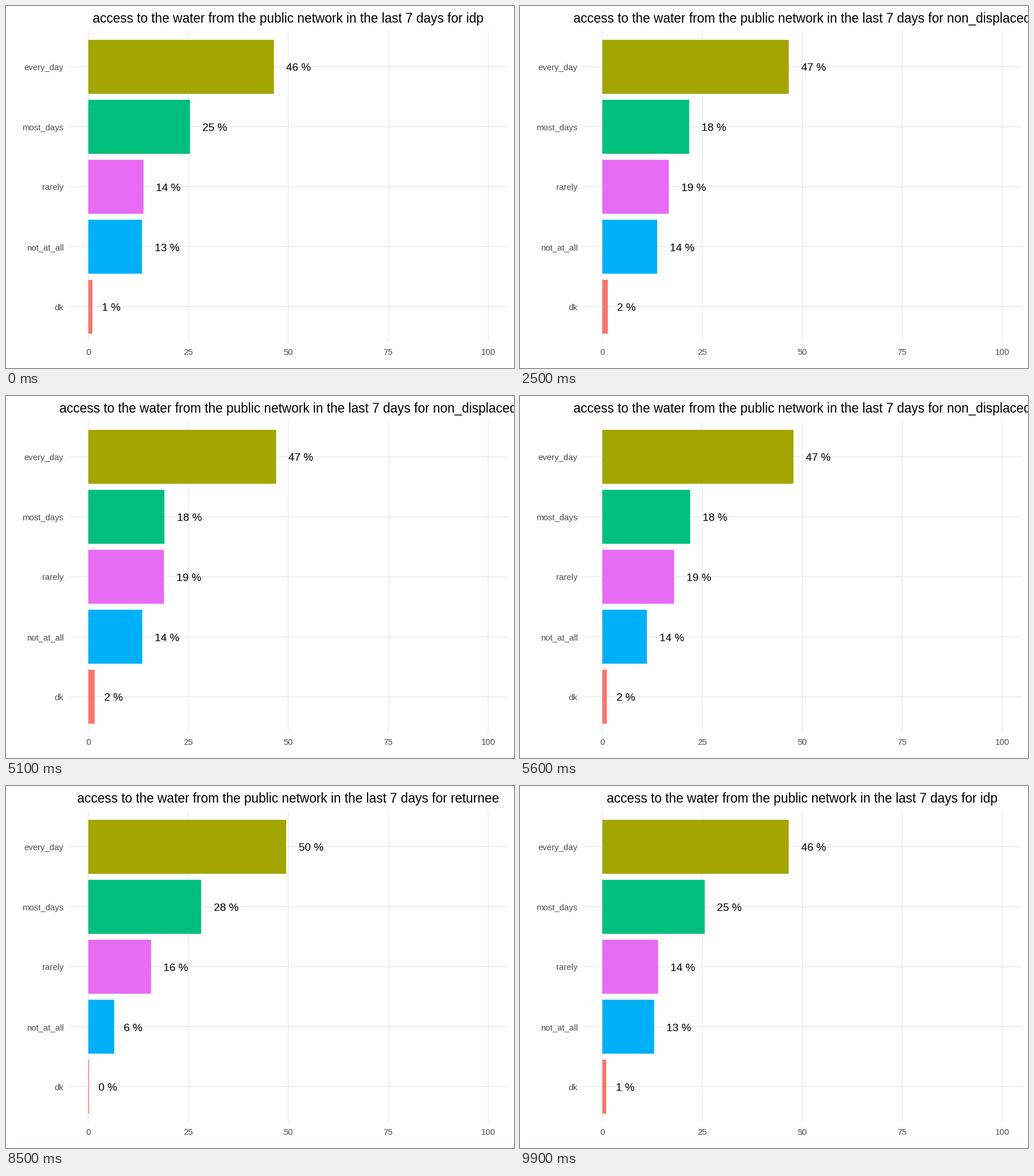
Write a matplotlib script that moves like this. It is 885 by 632 pixels and loops after 10 s.

```python
import matplotlib.pyplot as plt
from matplotlib.animation import FuncAnimation
from matplotlib.patches import Rectangle

W, H, DPI = 885, 632, 100
X0, UNIT = 143.4, 6.968           # pixel of zero, pixels per percent
LEFT, RIGHT, TOP, BOTTOM = 108.6, 875, 43.4, 587.8
ROW0, ROW = 106.2, 104.7          # first bar centre, row spacing
BAR = 0.9 * ROW
TITLE, LABEL, AXIS = 22.57, 18.97, 14.93   # text sizes in pixels
FRAMES, INTERVAL = 100, 100

ROWS = [("every_day", "#A3A500"), ("most_days", "#00BF7D"),
        ("rarely", "#E76BF3"), ("not_at_all", "#00B0F6"), ("dk", "#F8766D")]
GROUPS = [("idp", (46.4, 25.42, 13.81, 13.42, 1.03)),
          ("non_displaced", (46.79, 18.44, 19.1, 13.96, 1.68)),
          ("returnee", (49.66, 28.39, 15.81, 6.01, 0.14))]
SHOWN = [(46, 25, 14, 13, 1), (47, 18, 19, 14, 2), (50, 28, 16, 6, 0)]
MOVES = [(16, 17), (50, 17), (84, 16)]   # last resting frame, steps

plt.rcParams["font.family"] = ["Liberation Sans", "DejaVu Sans"]
fig = plt.figure(figsize=(W / DPI, H / DPI), dpi=DPI, facecolor="white")
ax = fig.add_axes([0, 0, 1, 1])
ax.set_xlim(0, W)
ax.set_ylim(H, 0)
ax.axis("off")


def write(x, y, text, px, color="black", ha="left"):
    return ax.text(x, y, text, fontsize=px * 72 / DPI, color=color,
                   ha=ha, va="baseline", zorder=4)


def grid(xs, ys):
    ax.plot(xs, ys, color="#EBEBEB", lw=1.5 * 72 / DPI, snap=False,
            solid_capstyle="butt", zorder=1)


for tick in range(0, 101, 25):
    x = X0 + UNIT * tick
    grid([x, x], [TOP, BOTTOM])
    write(x, 609, str(tick), AXIS, "#4D4D4D", "center")

title = write((LEFT + RIGHT) / 2, 29, "", TITLE, ha="center")
bars, labels = [], []
for i, (name, color) in enumerate(ROWS):
    y = ROW0 + ROW * i
    grid([LEFT, RIGHT], [y, y])
    write(100.4, y + 5.8, name, AXIS, "#4D4D4D", "right")
    bars.append(ax.add_patch(Rectangle((X0, y - BAR / 2), 0, BAR, lw=0,
                                       facecolor=color, snap=False,
                                       zorder=2)))
    labels.append(write(0, y + 7.2, "", LABEL))


def state(frame):
    """Current group, next group and progress between them."""
    for k, (start, steps) in enumerate(MOVES):
        if frame < start + steps:
            return k, (k + 1) % 3, max(0, frame - start) / steps
    return 0, 0, 0


def update(frame):
    a, b, t = state(frame)
    near = b if t >= 0.5 else a
    title.set_text("access to the water from the public network "
                   f"in the last 7 days for {GROUPS[near][0]}")
    for i, (bar, label) in enumerate(zip(bars, labels)):
        va, vb = GROUPS[a][1][i], GROUPS[b][1][i]
        width = UNIT * (va + (vb - va) * t)
        bar.set_width(width)
        digits = str(SHOWN[near][i])
        # the gap to the bar is half the label's own width
        gap = 0.5 * LABEL * (0.556 * len(digits) + 1.167)
        label.set_text(digits + " %")
        label.set_x(X0 + width + gap)
    return [title, *bars, *labels]


anim = FuncAnimation(fig, update, frames=FRAMES, interval=INTERVAL,
                     init_func=lambda: update(0), repeat=True,
                     repeat_delay=0, blit=False)
plt.show()
```
